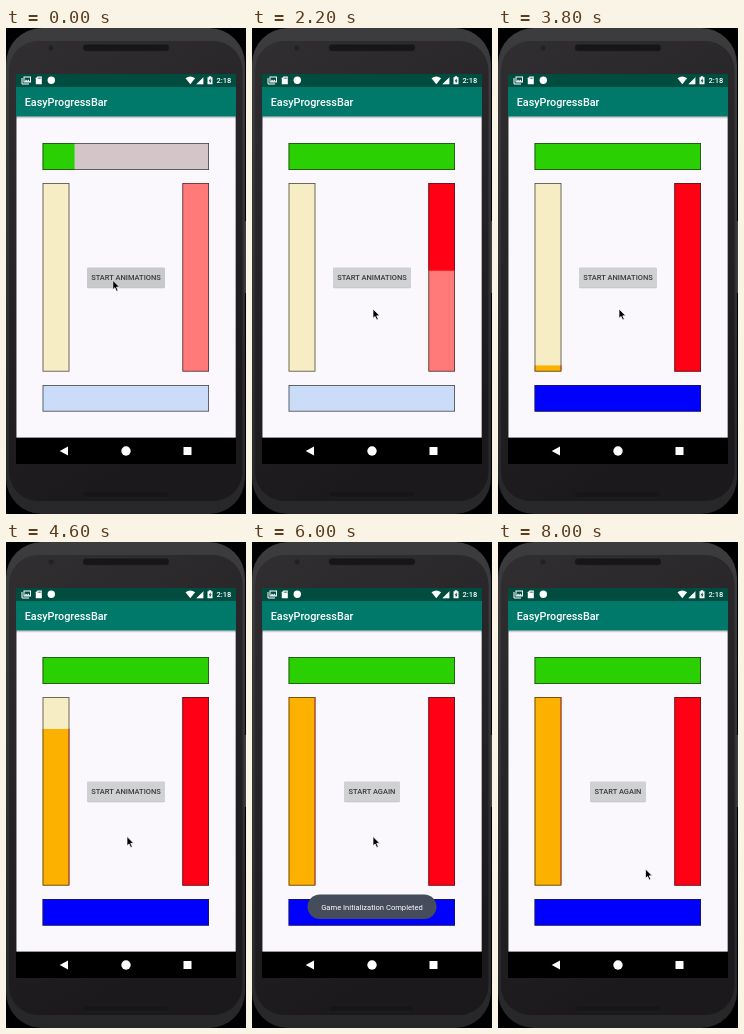
Animation of 240x486 px, one loop 8100 ms. Source, as an HTML page:

```html
<!DOCTYPE html>
<html lang="en">
<head>
<meta charset="utf-8">
<title>EasyProgressBar</title>
<style>
  html, body { margin: 0; width: 100%; height: 100%; overflow: hidden; background: #000; }
  svg { display: block; width: 100vw; height: 100vh; }
  text { font-family: Roboto, "Noto Sans", sans-serif; }
  .label { font-size: 7.5px; font-weight: 500; fill: #3a3a3c; text-anchor: middle; }
  .frame { fill: none; stroke: #222; stroke-opacity: .8; stroke-width: .8; }
</style>
</head>
<body>
<svg viewBox="0 0 240 486">
  <defs>
    <linearGradient id="shade" x2="0" y2="1">
      <stop offset="0" stop-color="#000" stop-opacity=".3"/>
      <stop offset="1" stop-color="#000" stop-opacity="0"/>
    </linearGradient>
    <linearGradient id="rim" x2="0" y2="1">
      <stop offset="0" stop-color="#3c3c3e"/>
      <stop offset="1" stop-color="#272729"/>
    </linearGradient>
    <linearGradient id="face" x2=".3" y2="1">
      <stop offset="0" stop-color="#302e30"/>
      <stop offset="1" stop-color="#1b191b"/>
    </linearGradient>
  </defs>

  <!-- phone body -->
  <rect width="239" height="486" rx="36" fill="url(#rim)"/>
  <rect x="3" y="13" width="233.500" height="460" rx="29" fill="url(#face)"/>
  <path d="M239.300 193V265" stroke="#48484a" stroke-width="1.200"/>
  <circle cx="45" cy="20" r="2.500" fill="#222123"/>
  <g fill="#171617" stroke="#222123" stroke-width=".6">
    <rect x="77" y="16.500" width="86" height="6.500" rx="3.200"/>
    <rect x="76.500" y="463" width="86" height="6.500" rx="3.200"/>
  </g>

  <!-- screen -->
  <rect x="10" y="46" width="220" height="390" fill="#000"/>
  <rect x="10.400" y="88" width="219.300" height="321.600" fill="#faf8fc"/>
  <rect x="10" y="88.400" width="220" height="2.500" fill="url(#shade)"/>
  <rect x="10" y="59" width="220" height="29.500" fill="#00796b"/>
  <rect x="10" y="46" width="220" height="13" fill="#004d40"/>
  <text x="18.700" y="77.900" font-size="10.8" font-weight="500" fill="#fff">EasyProgressBar</text>

  <!-- status icons -->
  <g fill="none" stroke="#fff" stroke-width="1">
    <path d="M16 50V56H23"/>
    <rect x="18" y="49" width="6.500" height="5"/>
  </g>
  <path d="M18.500 53.800L20 51.600L21.200 52.900L22.300 51.400L24 53.800Z" fill="#fff"/>
  <path d="M31.500 48.500H35.800V56.300H29.800V50.300Z" fill="#fff"/>
  <path d="M32.200 49.500V51M33.500 49.500V51M34.800 49.500V51" stroke="#004d40" stroke-width=".6"/>
  <circle cx="45.300" cy="52.300" r="3.700" fill="#fff"/>
  <path d="M179.500 50.300Q184.300 46.700 189.100 50.300L184.300 56.300Z" fill="#fff"/>
  <path d="M198 48.700V56.300H190.400Z" fill="#fff" opacity=".4"/>
  <path d="M197 49.700V56.300H190.400Z" fill="#fff"/>
  <path d="M202.800 48.300H205.200V49.200H206.500V56.300H201.500V49.200H202.800Z" fill="#fff"/>
  <path d="M204.600 50.300L202.700 53.300H203.800V55.500L205.500 52.500H204.600Z" fill="#004d40"/>
  <text x="210.400" y="55.300" font-size="7.5" font-weight="500" fill="#fff">2:18</text>

  <!-- navigation -->
  <g fill="#fff">
    <path d="M53.700 423L62 418.500V427.500Z"/>
    <circle cx="120" cy="423" r="4.700"/>
    <rect x="177.500" y="419" width="8" height="8" rx=".6"/>
  </g>

  <g id="bars"></g>

  <rect id="shadow" y="240.200" height="20" rx="1.500" fill="#000" opacity=".22"/>
  <rect id="button" y="239.400" height="20.200" rx="1.200"/>
  <text id="caption" class="label" x="120" y="252.100"></text>

  <g id="toast">
    <rect x="55.500" y="352.500" width="129" height="24.500" rx="12.200" fill="#454c5b"/>
    <text x="120" y="367.500" font-size="7.6" fill="#fff" text-anchor="middle">Game Initialization Completed</text>
  </g>

  <path id="cursor" d="M0 0V9.300L2.100 7.400L3.700 11L5.300 10.300L3.700 6.800H6.700Z"
    fill="#000" stroke="#fff" stroke-width=".7" stroke-linejoin="round"/>
</svg>

<script>
const LOOP = 8100, STEP = 100;
const $ = id => document.getElementById(id);
const clamp = v => Math.min(1, Math.max(0, v));
const ramp = (t, from, to) => clamp((t - from) / (to - from));
const ease = p => p * p * (3 - 2 * p);

function add(tag, attrs) {
  const el = document.createElementNS('http://www.w3.org/2000/svg', tag);
  set(el, attrs);
  $('bars').append(el);
  return el;
}
function set(el, attrs) {
  for (const k in attrs) el.setAttribute(k, attrs[k]);
}

const bars = [
  { x: 36.6, y: 115, w: 166.4, h: 27, back: '#d3c5c8', fill: '#2bd003', dir: 'right', from: -400, to: 1685 },
  { x: 176.4, y: 155, w: 26.6, h: 188.6, back: '#ff7a78', fill: '#ff0014', dir: 'down', from: 1735, to: 2735 },
  { x: 36.6, y: 357, w: 166.4, h: 26.6, back: '#cadcf8', fill: '#0000ff', dir: 'left', from: 2750, to: 3750 },
  { x: 36.6, y: 155, w: 26.8, h: 188.6, back: '#f7edc4', fill: '#fcb000', dir: 'up', from: 3767, to: 4770, edge: '#d23a50' }
];

for (const b of bars) {
  const box = { x: b.x, y: b.y, width: b.w, height: b.h };
  add('rect', { ...box, fill: b.back });
  b.el = add('rect', { ...box, fill: b.fill });
  add('rect', { x: b.x + .4, y: b.y + .4, width: b.w - .8, height: b.h - .8, class: 'frame' });
  if (b.edge) b.side = add('rect', { x: b.x + b.w - .8, y: b.y, width: .8, height: 0, fill: b.edge });
}

// cursor stops: start, end, x, y reached
const moves = [
  [1400, 1800, 121, 281],
  [4200, 4500, 121, 294.5],
  [6900, 7500, 147.5, 327]
];

function drawBar(b, t) {
  const p = ramp(t, b.from, b.to);
  const across = b.dir === 'left' || b.dir === 'right';
  const w = across ? b.w * p : b.w;
  const h = across ? b.h : b.h * p;
  const x = b.dir === 'left' ? b.x + b.w - w : b.x;
  const y = b.dir === 'up' ? b.y + b.h - h : b.y;
  set(b.el, { x, y, width: w, height: h });
  if (b.side) set(b.side, { y, height: Math.max(0, h - 1) });
}

function draw(t) {
  bars.forEach(b => drawBar(b, t));

  const done = t >= 4800;
  const width = done ? 56 : 78;
  for (const id of ['button', 'shadow']) set($(id), { x: 120 - width / 2, width });
  const grey = Math.round(200 + 8 * ramp(t, 0, 300));
  set($('button'), { fill: `rgb(${grey},${grey + 1},${grey + 2})` });
  $('caption').textContent = done ? 'START AGAIN' : 'START ANIMATIONS';

  set($('toast'), { opacity: ramp(t, 4800, 5200) * (1 - ramp(t, 6800, 7200)) });

  let x = 106.8, y = 252.3;
  for (const [from, to, nx, ny] of moves) {
    const p = ease(ramp(t, from, to));
    x += (nx - x) * p;
    y += (ny - y) * p;
  }
  set($('cursor'), { transform: `translate(${x} ${y})` });
}

const start = performance.now();
function tick() {
  const t = (performance.now() - start) % LOOP;
  draw(Math.floor(t / STEP) * STEP);
  requestAnimationFrame(tick);
}
tick();
</script>
</body>
</html>
```
